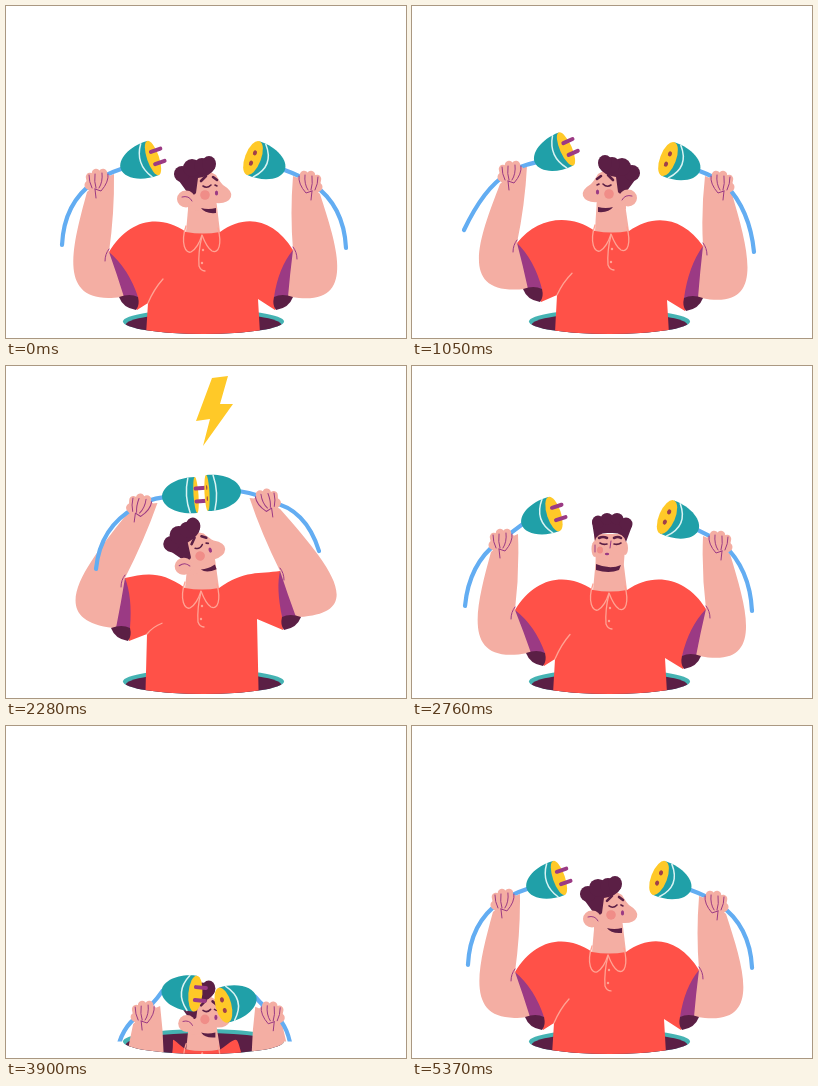
Animation, 400 px wide and 332 px high, one loop 5.4 s. Source, as an HTML page:

```html
<!DOCTYPE html>
<html lang="en">
<head>
<meta charset="utf-8">
<title>Plug and socket</title>
<style>
html, body { margin: 0; width: 100%; height: 100%; overflow: hidden; background: #fff; }
svg { display: block; width: 100vw; height: 100vh; }
</style>
</head>
<body>
<svg viewBox="0 0 400 332">
  <defs>
    <clipPath id="rim"><ellipse cx="197.5" cy="315.5" rx="80.5" ry="12.5"/></clipPath>
    <clipPath id="above"><path d="M0 0H400V315.5H278A80.5 12.5 0 0 1 117 315.5H0Z"/></clipPath>
    <clipPath id="boltShape"><path d="M206 12L222 10L214 38L227 38L197 80L204 53L190 55Z"/></clipPath>
  </defs>
  <ellipse cx="197.5" cy="315.5" rx="80.5" ry="12.5" fill="#45b3b3"/>
  <ellipse cx="197.5" cy="319" rx="78" ry="12" fill="#5b1f45" clip-path="url(#rim)"/>
  <g id="man" clip-path="url(#above)"></g>
  <path id="bolt" fill="#ffc928" clip-path="url(#boltShape)"/>
</svg>
<script>
const LOOP = 5400, STEP = 30, MIRROR = 394;
const SKIN = '#f4aea3', RED = '#ff5148', TEAL = '#20a0a8', YELLOW = '#ffc928', PURPLE = '#9b3a84',
  DARK = '#5b1f45', CABLE = '#63adf2', SEAM = '#ffa394', BLUSH = '#f08d88';

// body: centre x, neck y, half waist, head x, head y, head tilt, facing (-1 left, 0 front, 1 right)
// arm: hand x y angle, plug face x y angle width, cable end x y bend, elbow x y, shoulder x y, cuff x y
// right arms are stored mirrored
const pose = (body, left, right) => [...body, ...left, ...right];
const ARM = 16, LEFT = 7, RIGHT = LEFT + ARM;

const rest = pose([197, 226, 58, 197, 200, 0, 1],
  [92, 176, 0, 147, 152, -19, 6, 56, 239, 2, 50, 300, 103, 246, 132, 291],
  [91, 178, 0, 147, 152, -21, 8, 54, 242, 2, 43, 302, 107, 244, 126, 291]);
const lookLeft = pose([200, 225, 58, 199, 199, 0, -1],
  [99, 168, 0, 154, 143, -24, 6, 52, 224, 20, 45, 290, 105, 237, 130, 283],
  [85, 178, 0, 138, 153, -21, 8, 52, 246, 4, 40, 305, 103, 240, 122, 292]);
const joined = pose([196, 222, 57, 196, 201, -20, 1],
  [134, 141, 14, 190, 129, -4, 2.5, 90, 203, 4, 37, 253, 119, 212, 124, 262],
  [133, 136, 14, 193, 127, 3, 2.5, 81, 185, 13, 29, 247, 120, 205, 118, 251]);
const apart = pose([198, 224, 58, 198, 200, 0, 0],
  [90, 176, 0, 142, 148, -18, 7, 53, 240, 4, 48, 300, 103, 244, 133, 287],
  [87, 178, 0, 139, 151, -23, 8, 54, 245, 2, 41, 303, 100, 243, 124, 290]);
const stretch = pose([198, 209, 65, 197, 186, 0, 0],
  [106, 159, 0, 153, 124, -40, 7, 62, 207, 23, 62, 272, 117, 224, 138, 269],
  [100, 162, 0, 147, 124, -41, 8, 56, 211, 25, 62, 275, 112, 224, 130, 271]);
const tucked = pose([197, 250, 58, 197, 232, 0, 1],
  [143, 219, 0, 195, 203, 13, 7, 120, 286, -12, 110, 350, 165, 288, 172, 340],
  [133, 219, 0, 181, 218, 25, 8, 117, 281, -8, 95, 350, 155, 288, 160, 340]);

// Spreads the arms outwards and moves the whole figure vertically.
function shift(base, spreadLeft, spreadRight, dy = 0) {
  const p = [...base];
  p[1] += dy;
  p[4] += dy;
  for (const [at, spread] of [[LEFT, spreadLeft], [RIGHT, spreadRight]]) {
    for (const i of [0, 3, 7]) p[at + i] -= spread;
    p[at + 10] -= spread / 2;
    for (const i of [1, 4, 8, 11, 13, 15]) p[at + i] += dy;
  }
  return p;
}

const hidden = shift(tucked, 0, 0, 165), peeking = shift(tucked, 0, 0, 128);
const keys = [
  [0, rest], [300, shift(rest, 2, 21)], [540, rest], [840, shift(lookLeft, 13, 0, -2)],
  [1050, lookLeft], [1560, joined], [1680, joined], [1980, shift(joined, -2, -2, -1)],
  [2280, joined], [2580, shift(apart, 3, 8)], [2760, apart], [3150, shift(apart, 3, 0, 2)],
  [3390, apart], [3540, stretch], [3630, shift(stretch, -2, -2, -4)], [3990, peeking],
  [4050, hidden], [4500, hidden], [4560, peeking], [4650, tucked],
  [4800, shift(rest, 36, 32, -30)], [5010, shift(rest, -2, -2, 4)], [5190, shift(rest, 1, 1, -1)],
  [LOOP, rest]
];

const slope = (k, i) => k < 0 || k >= keys.length - 1 ? 0
  : (keys[k + 1][1][i] - keys[k][1][i]) / (keys[k + 1][0] - keys[k][0]);

// Tangents vanish at turning points, so holds stay still and passes stay fluid.
function tangent(k, i) {
  const a = slope(k - 1, i), b = slope(k, i);
  return a * b <= 0 ? 0 : 2 * a * b / (a + b);
}

function poseAt(t) {
  const k = keys.findIndex((key, i) => t < keys[i + 1][0]);
  const [t0, a] = keys[k], [t1, b] = keys[k + 1], span = t1 - t0;
  const u = (t - t0) / span, u2 = u * u, u3 = u2 * u;
  return a.map((v, i) => v + (b[i] - v) * (3 * u2 - 2 * u3)
    + span * (tangent(k, i) * (u3 - 2 * u2 + u) + tangent(k + 1, i) * (u3 - u2)));
}

const shape = (d, fill) => `<path d="${d}" fill="${fill}"/>`;
const line = (d, color, width = 1) =>
  `<path d="${d}" fill="none" stroke="${color}" stroke-width="${width}" stroke-linecap="round" stroke-linejoin="round"/>`;
const oval = (x, y, rx, ry, fill) => `<ellipse cx="${x}" cy="${y}" rx="${rx}" ry="${ry}" fill="${fill}"/>`;
const group = (transform, content) => `<g transform="${transform}">${content}</g>`;
const mirrored = content => group(`translate(${MIRROR} 0) scale(-1 1)`, content);

function turn(x, y, degrees) {
  const a = degrees * Math.PI / 180, c = Math.cos(a), s = Math.sin(a);
  return [x * c - y * s, x * s + y * c];
}

function readArm(v) {
  const [hx, hy, ha, fx, fy, fa, fw, ex, ey, bend, kx, ky, sx, sy, bx, by] = v;
  return { hx, hy, ha, fx, fy, fa, fw, ex, ey, bend, kx, ky, sx, sy, bx, by };
}

function torso(cx, ny, hw, l, r) {
  const R = x => MIRROR - x, armL = cx - 55, armR = cx + 55;
  const crease = 8 + (l.bx - l.sx) * 0.55;
  return shape(`M${cx - 17} ${ny}C${cx - 42} ${ny - 18} ${l.sx + 20} ${ny - 14} ${l.sx} ${l.sy}
      L${l.bx - 1} ${l.by + 13}L${armL} ${l.by + 6}L${cx - hw} 345H${cx + hw}L${armR} ${r.by + 2}
      L${R(r.bx - 1)} ${r.by + 13}L${R(r.sx)} ${r.sy}
      C${R(r.sx + 20)} ${ny - 14} ${cx + 42} ${ny - 18} ${cx + 17} ${ny}Z`, RED)
    + line(`M${armL} ${l.by + 6}Q${armL + 6} ${l.by + 4 - crease / 2} ${armL + 15} ${l.by + 6 - crease}`, SEAM, 1.3);
}

function arm(a) {
  const [ox, oy] = turn(-11, 10, a.ha), [ix, iy] = turn(16, -8, a.ha);
  const wx = a.hx + ox, wy = a.hy + oy, vx = a.hx + ix, vy = a.hy + iy, cuff = a.bx - 17;
  const inner = `${(a.sx + a.bx) / 2 + 5} ${(a.sy + a.by) / 2 - 6} ${a.bx} ${a.by}`;
  return shape(`M${wx} ${wy}C${(wx + a.kx) / 2} ${(wy + a.ky) / 2} ${a.kx} ${a.ky} ${cuff} ${a.by}
      L${a.bx} ${a.by}L${a.sx} ${a.sy}Q${(vx + a.sx) / 2 + 3} ${(vy + a.sy) / 2} ${vx} ${vy}
      Q${a.hx + 4} ${a.hy - 4} ${wx} ${wy}Z`, SKIN)
    + shape(`M${a.sx} ${a.sy}Q${inner}L${cuff + 3} ${a.by}Q${(a.sx + cuff) / 2 + 2} ${(a.sy + a.by) / 2} ${a.sx} ${a.sy}Z`, PURPLE)
    + shape(`M${cuff - 2} ${a.by}Q${a.bx - 8} ${a.by - 4} ${a.bx} ${a.by}Q${a.bx + 2} ${a.by + 8} ${a.bx - 2} ${a.by + 13}
      Q${cuff + 2} ${a.by + 11} ${cuff - 2} ${a.by}Z`, DARK)
    + line(`M${a.sx} ${a.sy - 3}Q${a.sx - 4} ${a.sy + 2} ${a.sx - 4} ${a.sy + 9}`, PURPLE);
}

function plug(a, isSocket) {
  const body = shape('M0 -18C-19 -19 -34 -10 -34 0C-34 10 -19 19 0 18Z', TEAL)
    + oval(0, 0, a.fw, 18, YELLOW)
    + line(`M-7 -17.5Q${-7 - 2 * a.fw} 0 -7 17.5`, '#d9f3f3', 1.5);
  const detail = isSocket
    ? oval(0, -5.5, a.fw / 4, 2.6, '#a0404a') + oval(0, 5.5, a.fw / 4, 2.6, '#a0404a')
    : line('M0 -6.5H10M0 6.5H10', PURPLE, 4);
  return group(`translate(${a.fx} ${a.fy}) rotate(${a.fa})`, body + detail);
}

function grip(a, isSocket) {
  const [tx, ty] = turn(-33, 0, a.fa);
  const cable = `M${a.fx + tx} ${a.fy + ty}Q${a.hx + 8} ${a.hy - 8} ${a.hx - 4} ${a.hy}
    Q${a.ex + a.bend} ${a.ey - 42} ${a.ex} ${a.ey}`;
  const fingers = line('M-8 -5L-6 5M-2 -9L-1 5M5 -9L3 6', SKIN, 8.5)
    + line('M-9 3L0 9L9 -3', SKIN, 9)
    + line('M-9 -7Q-9 0 -6 6M-3 -8Q-4 0 -2 6M4 -9Q5 0 1 6M10 -8Q11 0 3 9L-3 7M-3 7L-2 16', PURPLE);
  return line(cable, CABLE, 4.2) + plug(a, isSocket)
    + group(`translate(${a.hx} ${a.hy}) rotate(${a.ha})`, fingers);
}

function profile() {
  return shape('M-15 4L-14 -30Q0 -40 13 -31Q17 -24 20 -21Q30 -15 28 -9Q25 -2 13 -3L13 6Z', SKIN)
    + shape('M-29 -32L-16 -14Q-9 -9 -7 -13L-5 -28Q8 -30 12 -38L-10 -44Z', DARK)
    + oval(-21, -32, 8, 8, DARK) + oval(-11, -38, 9, 9, DARK) + oval(-1, -40, 8, 8, DARK) + oval(6, -42, 7, 8, DARK)
    + oval(-17, -7, 9, 8.5, SKIN) + line('M-21 -9Q-14 -11 -11 -5', PURPLE)
    + oval(2, -11, 4.8, 4.8, BLUSH)
    + shape('M-2 2Q5 4 13 2L13 7Q2 8 -2 2Z', DARK)
    + line('M-2 -25L3 -30M10 -29L14 -26', DARK, 2.6)
    + line('M0 -20Q4 -17 8 -21M12 -21L14 -20', DARK, 1.6)
    + oval(13.5, -13, 1.6, 2.6, PURPLE);
}

function frontFace() {
  return oval(-15, -17, 3.5, 8, SKIN) + oval(15, -18, 3, 7, SKIN)
    + shape('M-16 -32H16L14 -4Q13 6 0 6Q-14 6 -14 -2Z', SKIN)
    + shape('M-18 -44L-15 -25Q-13 -34 0 -33Q14 -34 16 -24L22 -40L10 -48Z', DARK)
    + oval(-12, -44, 6, 6.5, DARK) + oval(-3, -47, 6.5, 6, DARK) + oval(7, -47, 6.5, 6, DARK) + oval(16, -42, 6.5, 6.5, DARK)
    + shape('M-14 -2Q0 4 11 -1L9 4Q-1 8 -14 4Z', DARK)
    + line('M-11 -28Q-7 -30 -3 -28M4 -28Q8 -30 11 -28', DARK, 2.6)
    + line('M-10 -23Q-7 -21 -3 -22M4 -22Q8 -21 11 -23', DARK, 1.6)
    + line('M1 -25L0 -18M-15 -21L-15 -14', PURPLE)
    + oval(-10, -16, 3, 3.5, BLUSH) + oval(-3, -12, 2.2, 1.2, PURPLE);
}

function headAndNeck([cx, ny, , hx, hy, tilt, facing]) {
  const isProfile = Math.abs(facing) > 0.5;
  const flip = isProfile ? Math.sign(facing) * (0.7 + 0.3 * Math.abs(facing)) : 1;
  return shape(`M${hx - 14} ${hy - 8}L${cx - 17} ${ny}Q${cx} ${ny + 3} ${cx + 17} ${ny}L${hx + 13} ${hy - 8}Z`, SKIN)
    + group(`translate(${cx - 1} ${ny})`,
      line('M-16 -6C-22 12 -16 22 -11 20Q-4 16 0 3Q5 16 10 19C17 22 20 12 16 -4', SEAM, 1.3)
      + line('M0 4Q-4 20 -3 34Q-1 39 3 39', SEAM, 1.3)
      + oval(1, 18, 1.2, 1.2, SEAM) + oval(0, 31, 1.2, 1.2, SEAM))
    + group(`translate(${hx} ${hy}) rotate(${tilt}) scale(${flip} 1)`, isProfile ? profile() : frontFace());
}

let seed = 7;
const random = () => (seed = seed * 16807 % 2147483647) / 2147483647;
const grains = Array.from({ length: 3200 }, () => ({ x: 189 + random() * 39, y: 9 + random() * 72, rank: random() }));

function boltPath(t) {
  const cover = Math.max(0, Math.min(1, (t - 1560) / 210, (2430 - t) / 120));
  if (cover === 1) return 'M185 5H232V85H185Z';
  return grains.filter(g => g.rank < cover)
    .map(g => `M${g.x.toFixed(1)} ${g.y.toFixed(1)}h1.1v1.1h-1.1z`).join('');
}

const man = document.getElementById('man'), bolt = document.getElementById('bolt');

function render(t) {
  const p = poseAt(t);
  const l = readArm(p.slice(LEFT, RIGHT)), r = readArm(p.slice(RIGHT));
  man.innerHTML = torso(p[0], p[1], p[2], l, r) + arm(l) + mirrored(arm(r)) + headAndNeck(p)
    + grip(l, false) + mirrored(grip(r, true));
  bolt.setAttribute('d', boltPath(t));
}

const start = performance.now();
function tick() {
  const elapsed = performance.now() - start;
  render(Math.floor(elapsed / STEP) * STEP % LOOP);
  requestAnimationFrame(tick);
}
tick();
</script>
</body>
</html>
```
